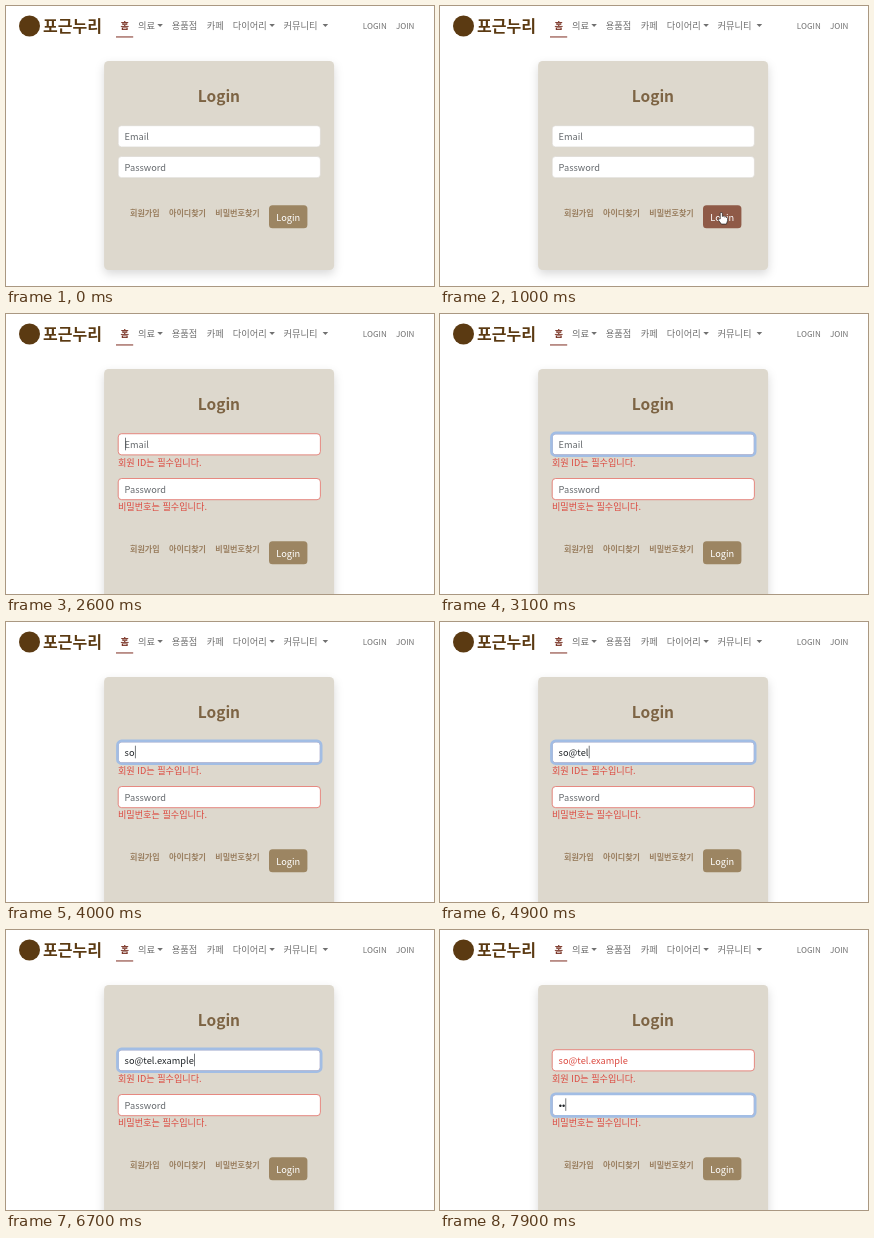
Write an HTML page that moves like this. It is 428 px wide and 280 px high and loops after 8000 ms.

```html
<!DOCTYPE html>
<html lang="ko">
<head>
<meta charset="utf-8">
<title>Login</title>
<style>
  html, body { margin: 0; width: 100%; height: 100%; overflow: hidden; background: #fff; }
  svg { display: block; width: 428px; height: 280px; }
  text { font: 9.25px "Noto Sans CJK KR", "Noto Sans KR", "Noto Sans CJK", "Noto Sans", sans-serif; white-space: pre; }

  .nav { fill: #707070; }
  .nav .active { fill: #7a3426; font-weight: 700; }
  .nav .small { font-size: 8.1px; }
  .brand text { font-size: 16px; font-weight: 700; fill: #5b3a12; }

  .card { fill: #ddd8cd; filter: drop-shadow(0 4.6px 4.6px rgba(0, 0, 0, .15)); }
  .title { font-size: 15.5px; font-weight: 700; fill: #7d6444; text-anchor: middle; }
  .links text { font-size: 8.05px; font-weight: 700; fill: #9a7f60; }
  .label { fill: #fff; text-anchor: middle; }
  .box { fill: #fff; stroke: #d8d6d1; stroke-width: .6; }
  .hint { fill: #666a6e; }
  .error rect { fill: none; stroke: #e8746b; stroke-width: .8; }
  .error text { font-size: 9.15px; fill: #dc4a40; }
  .ring rect { fill: none; stroke: #a2bde4; stroke-width: 2.8; }
  .dots { font-family: "Liberation Sans", sans-serif; fill: #212529; }
  .caret { fill: #3c4044; }

  /* 1% = 80ms */
  .step { animation: 8s step-end infinite; }
  .ease { animation: 8s linear infinite; }
  .card  { animation-name: grow; }
  .down1 { animation-name: down1; }
  .down2 { animation-name: down2; }
  .error { animation-name: error; }
  .btn   { animation-name: hover; fill: #9c8562; }
  .hand  { animation-name: hand; }
  .arrow { animation-name: arrow; }
  .beam  { animation-name: beam; }
  .ring1 { animation-name: ring1; }
  .ring2 { animation-name: ring2; }

  @keyframes grow  { 0% { height: 209px } 17.5%, 100% { height: 237px } }
  @keyframes down1 { 0% { transform: none } 17.5%, 100% { transform: translateY(14px) } }
  @keyframes down2 { 0% { transform: none } 17.5%, 100% { transform: translateY(28px) } }
  @keyframes error { 0% { opacity: 0 } 17.5%, 100% { opacity: 1 } }
  @keyframes hover { 0%, 17.5%, 100% { fill: #9c8562 } 12% { fill: #8f5a47 } }
  @keyframes hand  { 0%, 17.5%, 100% { opacity: 0 } 12% { opacity: 1 } }
  @keyframes arrow {
    0%, 17.49% { opacity: 0; transform: translate(281px, 207px) }
    17.5%, 25% { opacity: 1; transform: translate(281px, 207px); animation-timing-function: ease-in-out }
    30% { opacity: 1; transform: translate(257px, 134px) }
    30.01%, 100% { opacity: 0; transform: translate(257px, 134px) }
  }
  @keyframes beam  { 0%, 32%, 100% { opacity: 0 } 30% { opacity: 1 } }
  @keyframes ring1 { 0%, 32.5% { opacity: 0 } 34.4%, 88.75% { opacity: 1 } 90.6%, 100% { opacity: 0 } }
  @keyframes ring2 { 0%, 88.75% { opacity: 0 } 90.6%, 99.99% { opacity: 1 } 100% { opacity: 0 } }
</style>
</head>
<body>
<svg viewBox="0 0 428 280">
  <defs>
    <rect id="field" x="112.2" y="119.7" width="202.2" height="21.2" rx="3.4"/>
    <path id="drop" d="M0 0h5.6l-2.8 2.9z"/>
  </defs>

  <g class="brand">
    <circle cx="23.5" cy="20" r="10.5" fill="#5b3a12"/>
    <text x="37" y="26">포근누리</text>
  </g>

  <g class="nav">
    <text class="active" x="114.4" y="23">홈</text>
    <rect x="110" y="30.4" width="17.2" height="1.1" fill="#8a4035"/>
    <text x="132" y="23">의료</text>
    <text x="165.8" y="23">용품점</text>
    <text x="200.7" y="23">카페</text>
    <text x="226.7" y="23">다이어리</text>
    <text x="277.6" y="23">커뮤니티</text>
    <use href="#drop" x="151.3" y="18"/>
    <use href="#drop" x="263.3" y="18"/>
    <use href="#drop" x="316.6" y="18"/>
    <text class="small" x="356.8" y="22.7">LOGIN</text>
    <text class="small" x="389.9" y="22.7">JOIN</text>
  </g>

  <rect class="card step" x="98.1" y="55" width="230" height="209" rx="4.6"/>
  <text class="title" x="212.9" y="95.5">Login</text>

  <g>
    <use href="#field" class="box"/>
    <g class="error step">
      <rect x="112.2" y="119.7" width="202.2" height="21.2" rx="3.4"/>
      <text x="111.9" y="151.8">회원 ID는 필수입니다.</text>
    </g>
    <g class="ring ring1 ease"><rect x="111.5" y="119" width="203.6" height="22.6" rx="4.2"/></g>
    <text class="hint" id="mailHint" x="118.6" y="133.7">Email</text>
    <text id="mail" x="118.6" y="133.7"></text>
  </g>

  <g class="down1 step">
    <use href="#field" class="box" y="30.8"/>
    <g class="error step">
      <rect x="112.2" y="150.5" width="202.2" height="21.2" rx="3.4"/>
      <text x="111.9" y="182.4">비밀번호는 필수입니다.</text>
    </g>
    <g class="ring ring2 ease"><rect x="111.5" y="149.8" width="203.6" height="22.6" rx="4.2"/></g>
    <text class="hint" id="passHint" x="118.6" y="164.5">Password</text>
    <text class="dots" id="pass" x="118.8" y="164.8"></text>
  </g>

  <g class="down2 step">
    <g class="links">
      <text x="124" y="210">회원가입</text>
      <text x="163" y="210">아이디찾기</text>
      <text x="209.3" y="210">비밀번호찾기</text>
    </g>
    <rect class="btn step" x="263" y="199.3" width="38.4" height="23" rx="3.5"/>
    <text class="label" x="282.3" y="214.6">Login</text>
  </g>

  <rect class="caret" id="caret" width=".7" height="12.6"/>

  <g stroke-linejoin="round" stroke-width=".7">
    <path class="hand step" fill="#fff" stroke="#222"
      d="M280.2 213v-5.4q0-1.2 1.1-1.2t1.1 1.2v2.8q1.6-.6 2 .4 1.5-.5 1.8.6 1.3-.2 1.3 1.1v2.4l-1.1 3.2h-5l-3.1-4q-.4-1.4.8-1.2z"/>
    <path class="arrow ease" fill="#111" stroke="#fff"
      d="M0 0v9l2.1-1.9 1.4 3.2 1.5-.7-1.4-3.1h2.8z"/>
    <path class="beam step" fill="none" stroke="#444"
      d="M255.6 129.5q1.4 0 1.4 1v8q0 1-1.4 1M258.4 129.5q-1.4 0-1.4 1v8q0 1 1.4 1"/>
  </g>
</svg>
<script>
  const LOOP = 8000, FOCUS = 2560, TAB = 7100;
  const ADDRESS = "so@tel.example";
  const $ = id => document.getElementById(id);
  const mail = $("mail"), pass = $("pass"), caret = $("caret");

  const mailKeys = [...ADDRESS].map((_, i) => i < 8 ? 3700 + 240 * i : 5700 + 180 * (i - 8));
  const passKeys = [7600, 7800];
  const events = [FOCUS, ...mailKeys, TAB, ...passKeys];
  const typed = (keys, t) => keys.filter(k => k <= t).length;

  function draw(t) {
    const onPass = t >= TAB;
    mail.textContent = ADDRESS.slice(0, typed(mailKeys, t));
    mail.setAttribute("fill", onPass ? "#dc4a40" : "#212529");
    pass.textContent = "•".repeat(typed(passKeys, t));
    $("mailHint").style.opacity = mail.textContent ? 0 : 1;
    $("passHint").style.opacity = pass.textContent ? 0 : 1;

    // The caret blinks from the latest key press
    const last = Math.max(...events.filter(e => e <= t));
    caret.style.opacity = t >= FOCUS && (t - last) % 1000 < 500 ? 1 : 0;
    const line = onPass ? pass : mail;
    const width = line.textContent ? line.getComputedTextLength() : 0;
    caret.setAttribute("x", 119 + width);
    caret.setAttribute("y", onPass ? 168.3 : 123.7);
  }

  let start;
  function tick(now) {
    start ??= now;
    draw((now - start) % LOOP);
    requestAnimationFrame(tick);
  }
  draw(0);
  requestAnimationFrame(tick);
</script>
</body>
</html>
```
